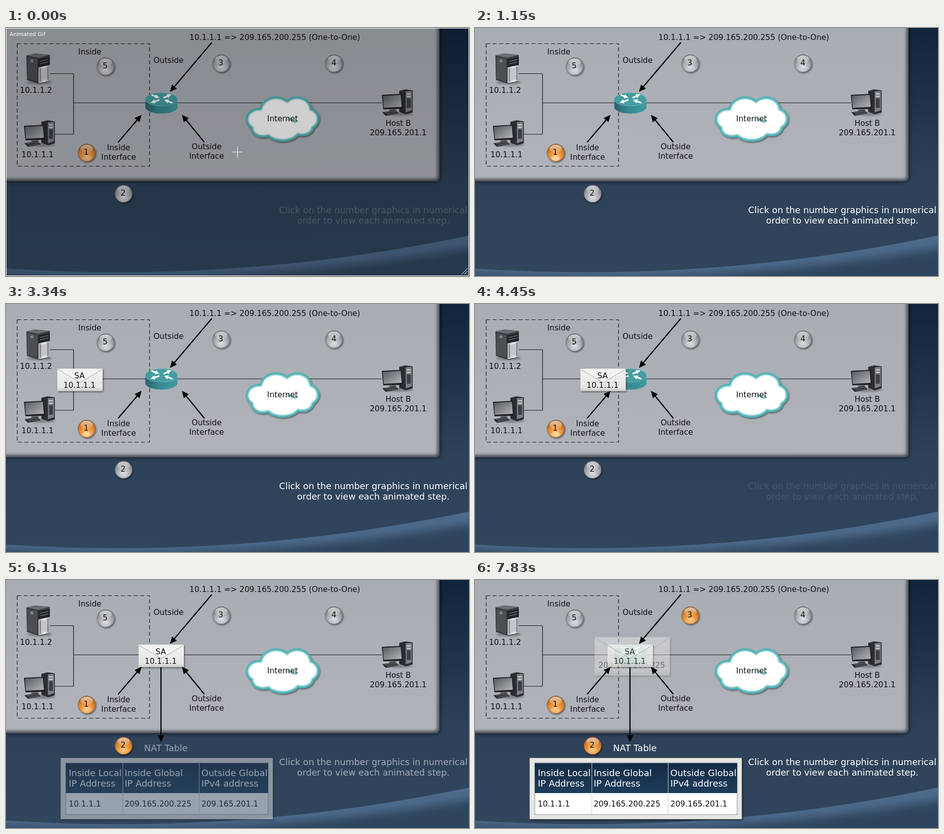
Animation of 929x497 px, one loop 8 s. Source, as an HTML page:

```html
<!DOCTYPE html>
<html lang="en">
<head>
<meta charset="utf-8">
<title>Static NAT step by step</title>
<style>
html, body { margin: 0; width: 100%; height: 100%; overflow: hidden; background: #30445a; }
svg { display: block; width: 929px; height: 497px; }
text { font: 15.6px "DejaVu Sans", Verdana, sans-serif; fill: #111; white-space: pre; }
.mid { text-anchor: middle; }
.big { font-size: 18px; fill: #fff; }
.hint { font-size: 17.8px; fill: #fff; }
.wire { fill: none; stroke: #15171a; stroke-width: 1.2; }
</style>
</head>
<body>
<svg id="stage" viewBox="0 0 929 497">
<defs>
  <linearGradient id="sky" x2="0" y2="1">
    <stop offset="0" stop-color="#10243b"/><stop offset=".62" stop-color="#2e4259"/><stop offset="1" stop-color="#30465d"/>
  </linearGradient>
  <linearGradient id="panel" x2="0" y2="1">
    <stop offset="0" stop-color="#a8adb3"/><stop offset="1" stop-color="#b0b3ba"/>
  </linearGradient>
  <radialGradient id="grey" cy=".68" r=".68">
    <stop offset="0" stop-color="#d6d8db"/><stop offset=".5" stop-color="#adb0b4"/><stop offset="1" stop-color="#6a6f74"/>
  </radialGradient>
  <radialGradient id="orange" cy=".72" r=".7">
    <stop offset="0" stop-color="#ffbd6c"/><stop offset=".5" stop-color="#ec8f36"/><stop offset="1" stop-color="#a35a17"/>
  </radialGradient>
  <linearGradient id="shine" x2="0" y2="1">
    <stop offset="0" stop-color="#fff" stop-opacity=".65"/><stop offset="1" stop-color="#fff" stop-opacity=".08"/>
  </linearGradient>
  <linearGradient id="teal">
    <stop offset="0" stop-color="#28636f"/><stop offset=".4" stop-color="#35868f"/><stop offset="1" stop-color="#3f9ca1"/>
  </linearGradient>
  <linearGradient id="steel">
    <stop offset="0" stop-color="#a6a9ad"/><stop offset=".5" stop-color="#eeeff0"/><stop offset="1" stop-color="#a0a3a7"/>
  </linearGradient>
  <linearGradient id="screen" x2="1" y2="1">
    <stop offset="0" stop-color="#55595e"/><stop offset=".5" stop-color="#85898d"/><stop offset="1" stop-color="#b4b7ba"/>
  </linearGradient>
  <linearGradient id="paper" x2="0" y2="1">
    <stop offset="0" stop-color="#f3f3f1"/><stop offset=".85" stop-color="#e6e7e4"/><stop offset="1" stop-color="#c9cac6"/>
  </linearGradient>
  <linearGradient id="head" x2="0" y2="1">
    <stop offset="0" stop-color="#132a44"/><stop offset="1" stop-color="#1d3d5a"/>
  </linearGradient>
  <filter id="soft" x="-20%" y="-20%" width="140%" height="140%"><feGaussianBlur stdDeviation="1.8"/></filter>
  <filter id="blend" filterUnits="userSpaceOnUse" x="-60" y="400" width="1050" height="200"><feGaussianBlur stdDeviation="9"/></filter>
  <filter id="bevel" filterUnits="userSpaceOnUse" x="-30" y="-30" width="930" height="360"><feGaussianBlur stdDeviation="3"/></filter>
  <filter id="shadow" x="-20%" y="-20%" width="150%" height="150%">
    <feDropShadow dx="1.5" dy="2" stdDeviation="1.5" flood-opacity=".5"/>
  </filter>
  <clipPath id="panelClip"><path d="M0 0H870V297Q870 307 860 307H0Z"/></clipPath>
  <clipPath id="waveClip"><path d="M0 482Q465 513 929 416V497H0Z"/></clipPath>
</defs>
</svg>
<script>
const stage = document.getElementById('stage');
const $ = id => document.getElementById(id);

const label = (x, y, s, cls = '') => `<text x="${x}" y="${y}" class="${cls}">${s}</text>`;
const mid = (x, y, s, cls = '') => label(x, y, s, 'mid ' + cls);
const rect = (x, y, w, h, fill, more = '') =>
  `<rect x="${x}" y="${y}" width="${w}" height="${h}" fill="${fill}" ${more}/>`;
const path = (d, fill, more = '') => `<path d="${d}" fill="${fill}" ${more}/>`;

function arrow(x1, y1, x2, y2, color = '#000', width = 2.4, head = 14) {
  const len = Math.hypot(x2 - x1, y2 - y1);
  const turn = Math.atan2(y2 - y1, x2 - x1) * 180 / Math.PI;
  return `<g transform="translate(${x1} ${y1}) rotate(${turn})">` +
    path(`M0 0H${len - head + 1}`, 'none', `stroke="${color}" stroke-width="${width}"`) +
    path(`M${len} 0l${-head} ${-head * .46}v${head * .92}z`, color) + '</g>';
}

const button = (n, x, y, dx = -1) => `<g transform="translate(${x} ${y})">
  <circle id="b${n}" r="17.5" fill="url(#grey)" stroke="#55595d" stroke-opacity=".5" filter="url(#shadow)"/>
  <ellipse cy="-8" rx="12.5" ry="8" fill="url(#shine)"/>
  <ellipse cy="10" rx="10" ry="6" fill="#fff" opacity=".17"/>
  ${n === 1 ? '<ellipse id="glow" cy="11.5" rx="7.5" ry="4.5" fill="#ffdca8"/>' : ''}
  ${mid(dx, 4, n)}</g>`;

function envelope(w, h, ip, ipY) {
  const x = -w / 2, y = -h / 2;
  return rect(x, y, w, h, 'url(#paper)', 'filter="url(#shadow)"') +
    path(`M${x} ${y + 1}L0 ${h * .12}L${-x} ${y + 1}`, '#f3f3f1', 'stroke="#bcbdb8" stroke-width="1.3"') +
    mid(-1, -3, 'SA') + mid(-1, ipY, ip);
}

const tower = (x, y, w, h) =>
  path(`M${x} ${y + 3}l${w * .45} -3l${w * .55} 2v${h - 6}l${-w * .5} 4l${-w * .5} -5z`, '#2b2d30') +
  path(`M${x + w * .48} ${y + 4}l${w * .46} -1v${h - 11}l${-w * .46} 4z`, '#7d8185') +
  path(`M${x + w * .56} ${y + 9}h${w * .3}M${x + w * .56} ${y + 14}h${w * .3}`, 'none', 'stroke="#d5d7d9" stroke-width="2"') +
  path(`M${x + w * .56} ${y + 18}h${w * .3}v${h * .38}h${-w * .3}z`, '#3c4044');

const desktop = `<g id="pc">
  <ellipse cx="70" cy="234" rx="29" ry="4" fill="#000" opacity=".25" filter="url(#soft)"/>
  ${tower(71, 185, 27, 50)}
  ${path('M36 196L76 194L78 224L39 225Z', '#1d1f22')}
  ${path('M38 198L74 196L76 220L40 222Z', 'url(#screen)')}
  ${path('M52 224h12l2 6h-16z', '#5c6066')}
  ${path('M37 231L62 227L70 233L44 238Z', '#25272a')}
  ${path('M42 232l22 -3M45 235l21 -3', 'none', 'stroke="#85898e"')}
</g>`;

const server = `<ellipse cx="67" cy="109" rx="25" ry="4" fill="#000" opacity=".25" filter="url(#soft)"/>` +
  path('M41 55L58 51L88 54L88 107L67 112L42 104Z', '#34373b') +
  path('M41 55L58 51L88 54L65 60Z', '#6a6d71') +
  path('M43 58L63 62V108L43 102Z', '#4b4e52') +
  path('M65 62L88 57V106L65 111Z', 'url(#steel)') +
  path('M65 62L88 57V74L65 79Z', '#222427') +
  path('M68 67l17 -4M68 72l17 -4', 'none', 'stroke="#8d9094" stroke-width="1.2"') +
  path('M70 82L83 79V102L70 106Z', '#c3c5c8') +
  path('M69 81v26M84 78v26', 'none', 'stroke="#4a4d51" stroke-width="1.2"') +
  '<circle cx="52" cy="66" r="3" fill="#85888c"/>';

const router = path('M279.500 143V160A32.500 13 0 0 0 344 160V143Z', 'url(#teal)') +
  '<ellipse cx="311.700" cy="143" rx="32.300" ry="13.300" fill="#459da1" stroke="#78bfc1" stroke-width=".8"/>' +
  [[292, 134, 308, 140], [316, 140, 332, 133], [308, 144, 290, 150], [334, 150, 317, 144]]
    .map(a => arrow(...a, '#fff', 3.2, 9)).join('');

const lobes = [[508,183,27,23], [542,167,34,30], [584,164,30,27], [604,182,25,23],
  [555,203,37,25], [516,201,25,19], [594,199,24,18]];
const puff = (cut, fill, filter) => `<g fill="${fill}" filter="url(#${filter})">` +
  lobes.map(([x, y, rx, ry]) => `<ellipse cx="${x}" cy="${y}" rx="${rx - cut}" ry="${ry - cut}"/>`).join('') + '</g>';
const cloud = puff(0, '#4db2b5', 'shadow') + puff(5, '#fff', 'soft');

const columns = [[126, 'Inside Local', 'IP Address', '10.1.1.1'],
  [238, 'Inside Global', 'IP Address', '209.165.200.225'],
  [392, 'Outside Global', 'IPv4 address', '209.165.201.1']];
const table = label(277, 343, 'NAT Table', 'big') +
  rect(109.5, 356.5, 426, 123, '#e6e7e3', 'stroke="#6d7278" filter="url(#shadow)"') +
  rect(120, 366, 406, 104, '#fff', 'stroke="#8b8f92"') +
  rect(120, 367, 406, 60, 'url(#head)') +
  path('M234.500 367V470M387.500 367V470', 'none', 'stroke="#c9ccce"') +
  columns.map(([x, a, b, c]) => label(x, 393, a, 'big') + label(x, 414, b, 'big') + label(x, 454, c)).join('');

const panelEdge = 'M-20 -20H870V297Q870 307 860 307H-20';
stage.insertAdjacentHTML('beforeend', [
  rect(0, 0, 929, 497, 'url(#sky)'),
  '<g clip-path="url(#waveClip)">',
  rect(0, 400, 929, 97, '#4d6a8b'),
  path('M-60 488Q465 528 990 430V600H-60Z', '#2f455d', 'filter="url(#blend)"'),
  '</g>',
  path(panelEdge, 'none', 'stroke="#000" stroke-opacity=".5" stroke-width="5" filter="url(#bevel)"'),
  '<g clip-path="url(#panelClip)">',
  rect(0, 0, 870, 307, 'url(#panel)'),
  path(panelEdge, 'none', 'stroke="#3c4046" stroke-width="8" filter="url(#bevel)"'),
  '</g>',
  rect(22.5, 31.5, 265.5, 245.5, 'none', 'class="wire" stroke-dasharray="8 5"'),
  path('M88 91.500H135.500V213H97M135.500 150H754', 'none', 'class="wire"'),
  server, desktop, '<use href="#pc" x="718" y="-62"/>', cloud, router,
  label(368, 24, '10.1.1.1 =&gt; 209.165.200.255 (One-to-One)'),
  label(145, 53, 'Inside'), label(296, 70, 'Outside'),
  label(28, 130, '10.1.1.2'), label(31, 259, '10.1.1.1'),
  mid(226, 245, 'Inside'), mid(226, 264, 'Interface'),
  mid(402.5, 243, 'Outside'), mid(402.5, 262, 'Interface'),
  mid(555, 187, 'Internet'), mid(787, 196, 'Host B'), mid(787, 215, '209.165.201.1'),
  button(1, 162, 250), button(2, 236, 332), button(3, 432, 71), button(4, 658, 71, 0), button(5, 200, 77),
  `<g id="wide" transform="translate(315.500 153)">${envelope(151, 77, '209.165.200.225', 23)}</g>`,
  `<g id="mail">${envelope(91, 45, '10.1.1.1', 16)}</g>`,
  arrow(413, 29, 329, 128), arrow(225, 229, 272, 174), arrow(398, 229, 353, 174),
  `<g id="down">${arrow(311, 175, 311, 325)}</g>`,
  `<g id="table">${table}</g>`,
  `<g id="hint">${mid(737, 371, 'Click on the number graphics in numerical', 'hint')}${mid(737, 392, 'order to view each animated step.', 'hint')}</g>`,
  '<g id="veil">', rect(0, 0, 929, 497, '#000', 'opacity=".19"'),
  rect(.5, .5, 928, 496, 'none', 'stroke="#fff"'),
  path('M454 248.500H475M464.500 238V259M914 494L926 482M919 494L926 487M924 494L926 492', 'none', 'stroke="#fff"'),
  '<text x="7" y="16" style="font-size:11px;fill:#fff">Animated Gif</text></g>'
].join(''));

// The scene advances in discrete steps, about 555 ms apart.
const times = [0, 60, 590, 1150, 1710, 2260, 2810, 3340, 3900, 4450, 4990, 5550, 6110, 6700, 7260, 7830];
const route = [[71, 211], [103, 212], [141, 190], [148.5, 152], [202, 152], [257, 152], [311.5, 152]];
const pulse = [.55, .1, .58, 1];
const show = (id, a) => $(id).setAttribute('opacity', a);
const light = (n, on) => $('b' + n).setAttribute('fill', on ? 'url(#orange)' : 'url(#grey)');

function draw(now) {
  const t = now % 8000;
  const step = times.findLastIndex(at => at <= t);
  const [x, y] = route[Math.min(Math.max(step - 4, 0), route.length - 1)];
  $('mail').setAttribute('transform', `translate(${x} ${y})`);
  show('mail', step < 4 ? 0 : step < 15 ? 1 : .75);
  show('wide', step < 15 ? 0 : .4);
  show('veil', step < 3 ? 1 : 0);
  show('hint', step < 2 ? .2 : pulse[step % 4]);
  show('glow', step < 3 ? .25 : step < 11 ? .75 : .2);
  show('down', step < 11 ? 0 : 1);
  show('table', step < 12 ? 0 : step < 13 ? .5 : 1);
  light(1, true);
  light(2, step >= 11);
  light(3, step >= 13);
  requestAnimationFrame(draw);
}
draw(performance.now());
</script>
</body>
</html>
```
